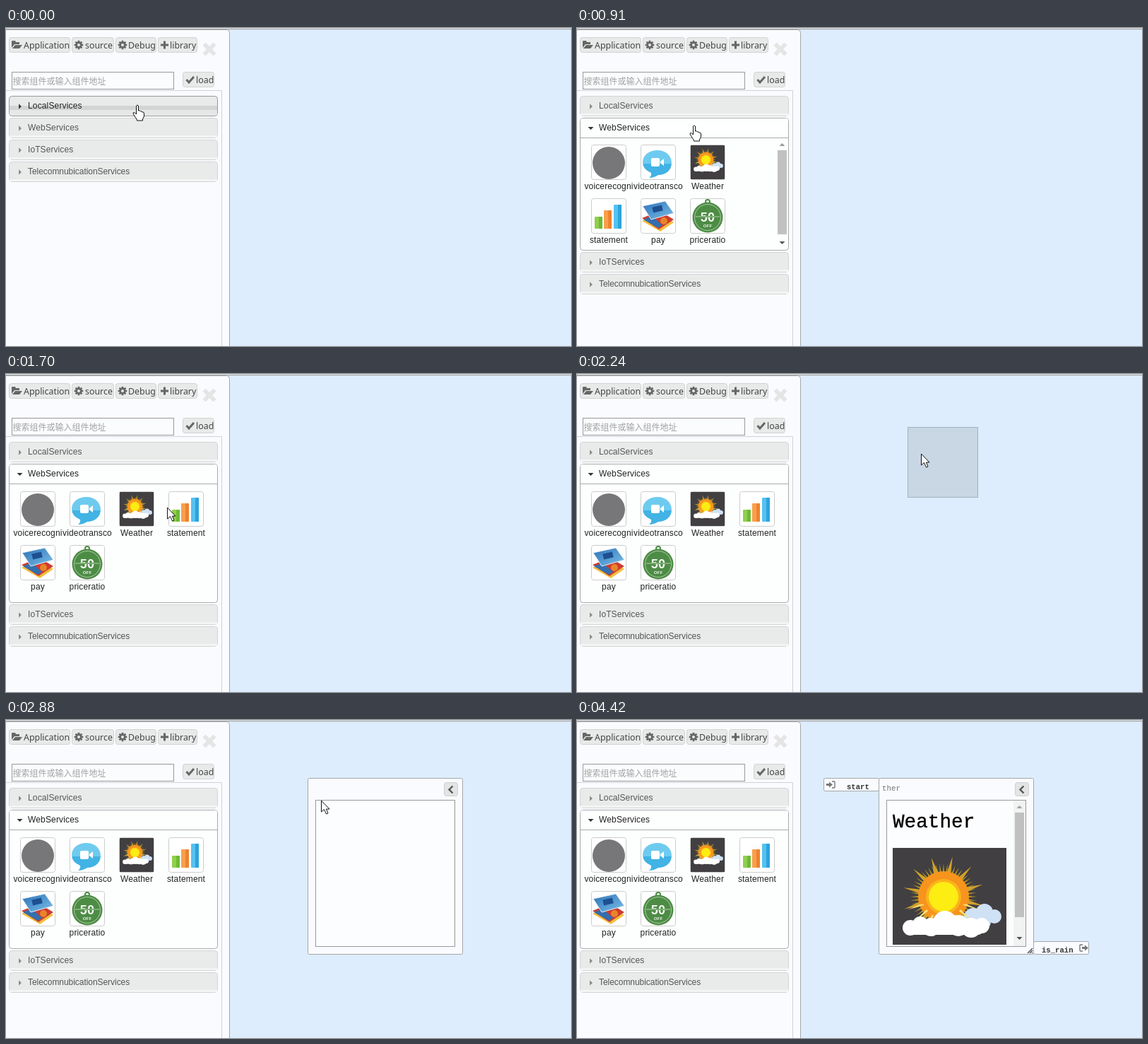
Recreate the animation shown at these times as an HTML page. Size 800 by 450 pixels, loop 5.25 s.

```html
<!DOCTYPE html>
<html lang="en">
<head>
<meta charset="utf-8">
<style>
html, body { margin: 0; width: 100%; height: 100%; overflow: hidden; background: #ddedfd; }
svg { display: block; }
text { white-space: pre; }
.ui { font: 12.4px "Noto Sans", "Open Sans", sans-serif; fill: #444; }
.arial { font: 12px "Liberation Sans", Arial, sans-serif; letter-spacing: .15px; }
.mono { font-family: "Liberation Mono", monospace; }
.hint { font: 300 12px "Noto Sans CJK SC", "Noto Sans CJK", sans-serif; fill: #a2a2a2; }
</style>
</head>
<body>
<svg id="stage" width="800" height="450" viewBox="0 0 800 450">
  <defs>
    <linearGradient id="bubble" x2="0" y2="1">
      <stop offset=".5" stop-color="#6ecbef"/><stop offset=".5" stop-color="#41b3e4"/>
    </linearGradient>
    <linearGradient id="card" x2="1" y2="1">
      <stop offset="0" stop-color="#2a71b8"/><stop offset="1" stop-color="#7cc0e8"/>
    </linearGradient>
    <clipPath id="listClip"><rect id="listWindow" x="5" y="156" width="294"/></clipPath>
    <clipPath id="pageClip"><rect x="439" y="114" width="179" height="204"/></clipPath>
  </defs>
  <g id="base"></g>
  <g id="scene"></g>
</svg>
<script>
const LOOP = 5250;
const $ = id => document.getElementById(id);

// --- drawing helpers ---
const rect = (x, y, w, h, fill, more = '') =>
  `<rect x="${x}" y="${y}" width="${w}" height="${h}" fill="${fill}" ${more}/>`;
const box = (x, y, w, h, fill, stroke, r = 0) =>
  rect(x + .5, y + .5, w - 1, h - 1, fill, `stroke="${stroke}" rx="${r}"`);
const circle = (x, y, r, fill, more = '') =>
  `<circle cx="${x}" cy="${y}" r="${r}" fill="${fill}" ${more}/>`;
const path = (d, fill, more = '') => `<path d="${d}" fill="${fill}" ${more}/>`;
const line = (d, color, width = 1, more = '') =>
  path(d, 'none', `stroke="${color}" stroke-width="${width}" ${more}`);
const text = (x, y, str, cls, more = '') => `<text x="${x}" y="${y}" class="${cls}" ${more}>${str}</text>`;
const move = (x, y, body, scale = 1) => `<g transform="translate(${x} ${y}) scale(${scale})">${body}</g>`;
const triangle = (x, y, turn, color, size = 4) =>
  path(`M${-size} ${-size / 2}H${size}L0 ${size / 2}z`, color, `transform="translate(${x} ${y}) rotate(${turn})"`);
const ring = (n, fn) => Array.from({ length: n }, (_, i) => fn(i * 2 * Math.PI / n, i)).join('');

// --- toolbar glyphs ---
const gear = (x, y) => {
  const teeth = ring(8, a => `M0 0L${6.3 * Math.cos(a)} ${6.3 * Math.sin(a)}`);
  return move(x, y, line(teeth, '#666', 2.6) + circle(0, 0, 3.4, 'none', 'stroke="#666" stroke-width="2.6"')
    + circle(0, 0, 2, '#e9e9e9'));
};
const folder = path('M8 28V19q0-1 1-1h4l1 2h5v3h-7z', '#666') + path('M9 29l4-5h10l-4 5z', '#666');
const button = (x, y, w, label, labelX) =>
  box(x, y, w, 22, '#e8e9e9', '#d2d2d2', 3) + text(labelX, y + 16, label, 'ui');

$('base').innerHTML =
  rect(0, 0, 800, 1, '#e4e6e8') + rect(0, 1, 800, 1.2, '#a4a7aa')
  + path('M0 2.500H312.500q4 0 4 4V451H-1V2.500z', '#fafbfe', 'stroke="#a4a7aa"')
  + button(4, 13, 87, 'Application', 25) + folder
  + button(93, 13, 60, 'source', 112) + gear(103, 24)
  + button(155, 13, 58, 'Debug', 173) + gear(165, 24)
  + button(215, 13, 56, 'library', 232) + line('M219 24h11M224.500 18.500v11', '#666', 3)
  + line('M280.500 22.500l15 15m0-15l-15 15', '#e5e5e5', 6)
  + box(8, 62, 230, 25, '#fbfcfe', '#999') + text(9.5, 79.5, '搜索组件或输入组件地址', 'hint')
  + button(250, 62, 45, 'load', 269) + line('M255.500 73l3.500 4 7-8', '#666', 3)
  + line('M0 88.500H305.500V450', '#d0d2d4');

// --- accordion ---
const header = (y, label, state, spacing = .15) => {
  const active = state === 'active', hover = state === 'hover';
  const edge = hover ? '#999' : active ? '#aaa' : '#d3d3d3';
  const ink = state ? '#212121' : '#555';
  let face = box(4, y, 296, 29, active ? '#fdfefe' : '#e9eaea', edge, 4);
  if (hover) face += rect(5, y + 14, 294, 6, '#d3d5d5') + rect(5, y + 20, 294, 7, '#e6e8e8');
  else if (!active) face += rect(5, y + 25, 294, 3, '#f3f4f4');
  return face + triangle(active ? 19.5 : 20, y + 15, active ? 0 : -90, state ? '#333' : '#888', active ? 4 : 3.7)
    + text(31, y + 18, label, 'arial', `fill="${ink}" style="letter-spacing:${spacing}px"`);
};

// Sun over clouds, on a 161 px square
const weather = () => {
  const ray = (a, r0, r1, half) => {
    const p = (r, b) => `${72 + r * Math.cos(b)} ${69 + r * Math.sin(b)}`;
    return `M${p(r0, a - half)}L${p(r1, a)}L${p(r0, a + half)}z`;
  };
  const puffs = [[25, 113, 11], [39, 108, 11], [54, 112, 13], [74, 106, 17], [93, 110, 15], [111, 113, 14], [126, 110, 11]];
  const back = [[114, 98, 13], [130, 91, 12], [144, 97, 10], [126, 104, 13]];
  return rect(0, 0, 161, 161, '#413f42')
    + path(ring(52, a => ray(a, 34, 47, .035)), '#b79a24')
    + path(ring(12, a => ray(a + .22, 34, 58, .09)), '#d3a12b')
    + circle(72, 69, 36, '#f7941d')
    + circle(72, 69, 25, '#fbb31c') + circle(72, 69, 21, '#fced12')
    + back.map(c => circle(...c, '#cfe1f5')).join('')
    + path(ring(18, a => ray(a, 30, 54, .05)), '#f8e27a', 'clip-path="inset(60% 0 0 0)"')
    + puffs.map(c => circle(...c, '#fff')).join('') + rect(22, 110, 105, 13, '#fff', 'rx="6"');
};
const bar = (x, y, h, light, dark) =>
  rect(x, y, 11, h, light, 'rx="1"') + rect(x + 6, y, 5, h, dark, 'rx="1"');

// Every icon is drawn on a 50 px tile
const icons = {
  voicerecogni: circle(25, 26, 23, '#777779'),
  videotransco: path('M24 8c12 0 20 8 20 18s-8 17-19 17q-6 4-13 4 4-3 3-7Q3 35 3 25C3 15 12 8 24 8z', 'url(#bubble)')
    + rect(15, 19, 12, 12, '#fff', 'rx="2"') + path('M28 24l5-4v10l-5-4z', '#fff'),
  Weather: move(1, 1, weather(), 48 / 161),
  statement: bar(5, 26, 17, '#8ed04c', '#6fb935') + bar(18, 17, 26, '#f8a04c', '#ee8330') + bar(32, 9, 34, '#56c2f0', '#2ba4de'),
  pay: path('M2 32l24-10 21 12-19 13z', '#f3bd3c') + path('M2 28l25-10 20 12-21 14z', '#cf3b31')
    + path('M4 30l12-5 15 13-6 4z', '#336fae') + circle(33, 32, 5, '#e8842a')
    + path('M3 11L35 4l12 17-32 9z', 'url(#card)', 'stroke="#e8eef4"')
    + rect(17, 11, 14, 8, '#1d4f91', 'transform="rotate(-14 24 15)"'),
  priceratio: circle(25, 5, 3, 'none', 'stroke="#4d8c45" stroke-width="2"') + circle(25, 27, 21.500, '#4d8c45')
    + circle(25, 27, 18.500, 'none', 'stroke="#c3dbbd" stroke-width=".8"')
    + text(25, 33, '50', 'arial', 'text-anchor="middle" fill="#f4f8f2" style="font-size:18px;font-weight:700"')
    + line('M8 26h34', '#7fae78', 2)
    + text(25, 41, 'OFF', 'arial', 'text-anchor="middle" fill="#eef5ec" style="font-size:6px;font-weight:700"')
};
const tiles = (top, cols) => Object.entries(icons).map(([name, art], i) => {
  const x = 10 + i % cols * 70, y = top + Math.floor(i / cols) * 76;
  return move(x + 10, y, box(0, 0, 50, 50, '#fff', '#ccc', 3) + art)
    + text(x + 35, y + 63, name, 'arial', 'text-anchor="middle" fill="#222"');
}).join('');

const listScrollbar = bottom => {
  const open = bottom - 155, track = bottom - 190;
  return (track > 0 ? rect(284, 173, 13, track * open / 168, '#c1c1c1') : '')
    + triangle(290.5, 155 + Math.min(10, open / 3), 180, '#999')
    + triangle(290.5, bottom - Math.min(11, open / 3.5), 0, '#555');
};

// [time, panel bottom, top of the icons]
const openings = [[0, 156, 0], [670, 173, 157], [790, 247, 161], [910, 315, 165], [1060, 324, 166]];
const accordion = t => {
  const [, bottom, top] = at(openings, t), settled = t >= 1060;
  $('listWindow').setAttribute('height', bottom - 157);
  let out = header(96, 'LocalServices', t < 270 ? 'hover' : '');
  if (top) {
    out += box(4, 127, 296, bottom - 127, '#fdfefe', '#aaa', 4)
      + `<g clip-path="url(#listClip)">${tiles(top, settled ? 4 : 3)}${settled ? '' : listScrollbar(bottom)}</g>`
      + path('M5 155V131q0-3 3-3h288q3 0 3 3v24z', '#fdfefe') + line('M4 155.500h296', '#aaa')
      + triangle(19.5, 142, 0, '#333') + text(31, 145, 'WebServices', 'arial', 'fill="#212121"');
  } else out += header(127, 'WebServices', t < 270 ? '' : 'hover');
  return out + header(bottom + 2, 'IoTServices', '', .08) + header(bottom + 33, 'TelecomnubicationServices', '', -.05);
};

// --- component window on the canvas ---
const doorArrow = (x, y, out) => move(x, y, out
  ? line('M5 1H2Q1 1 1 2v7q0 1 1 1h3', '#777', 1.4) + path('M4 4h4V1.500l5 4-5 4V7H4z', '#777')
  : line('M8 1h3q1 0 1 1v7q0 1-1 1H8', '#777', 1.4) + path('M0 4h4V1.500l5 4-5 4V7H0z', '#777'));
const port = (x, y, label, labelX, iconX, out) =>
  box(x, y, 79, 19, '#fafbfe', '#a4a7aa', 2) + doorArrow(iconX, y + 4, out)
  + text(labelX, y + 16, label, 'mono', 'font-size="10.600" font-weight="700" fill="#333"');

const component = t => {
  if (t < 2880) return '';
  let out = '';
  if (t >= 3310) out += port(349, 82, 'start', 382, 353, false) + port(646, 313, 'is_rain', 658, 711, true);
  out += box(427, 82, 220, 250, '#fafbfe', '#a4a7aa', 2)
    + box(620, 88, 20, 20, '#e3e4e4', '#cfcfcf', 3) + line('M632.500 93.500l-5 5 5 5', '#555', 2.4)
    + box(438, 113, 198, 208, '#fcfdfe', '#999');
  if (t >= 3310) out += text(432, 100, 'ther', 'mono', 'font-size="10.800" fill="#777"');
  if (t >= 3020) out += text(447, 152, 'Weather', 'mono', 'font-size="27.700" fill="#000" stroke="#000" stroke-width=".3"')
    + line('M638 330l7-7M641 330l4-4M644 330l1-1', '#444', 1.2);
  if (t >= 3150) out += `<g clip-path="url(#pageClip)">${move(447, 181, weather())}</g>`
    + rect(618, 114, 17, 206, '#f1f2f2') + rect(620, 131, 13, 148, '#c1c1c1')
    + triangle(626.5, 123, 180, '#a0a0a0') + triangle(626.5, 309, 0, '#505050');
  return out;
};

// --- pointer: [time, x, y] ---
const pointer = [
  [0, 179, 108], [120, 170, 113], [270, 159, 137], [1180, 160, 141], [1300, 163, 158], [1430, 163, 167],
  [1570, 176, 210], [1700, 228, 189], [1850, 400, 130], [1970, 487, 103], [2240, 487, 113], [2360, 474, 116],
  [2480, 455, 115], [2600, 446, 115], [2880, 446, 114], [4150, 575, 240], [4270, 688, 352]
];
const HAND = 'M5 2q1.500-2 3 0v7q2-1 3 1q2-.5 2.500 1q2.500-.5 2.500 2v4l-2 4v2h-8l-.5-2q-3-4-5-8q0-2 2-1.500l2.500 2.500z';
const ARROW = 'M0 0v16l4-3.500 3 6.500 2.500-1-2.500-6h4.500z';
const cursor = t => {
  if (t >= 4420) return '';
  const [, x, y] = at(pointer, t);
  const ghost = t >= 1850 && t < 2880 ? box(x - 19, y - 38, 100, 100, '#c9d7e4', '#a3b0bc') : '';
  return ghost + move(x + .5, y, path(t < 1300 ? HAND : ARROW, '#fff', 'stroke="#111" stroke-linejoin="round"'));
};

const at = (steps, t) => steps.findLast(s => s[0] <= t);
const cuts = [...new Set([...openings, ...pointer].map(s => s[0]).concat(3020, 3150, 3310, 4420))].sort((a, b) => a - b);
let shown = -1;
function update() {
  const t = performance.now() % LOOP;
  const cut = cuts.findLast(c => c <= t);
  if (cut !== shown) {
    shown = cut;
    $('scene').innerHTML = accordion(cut) + component(cut) + cursor(cut);
  }
  requestAnimationFrame(update);
}
update();
</script>
</body>
</html>
```
